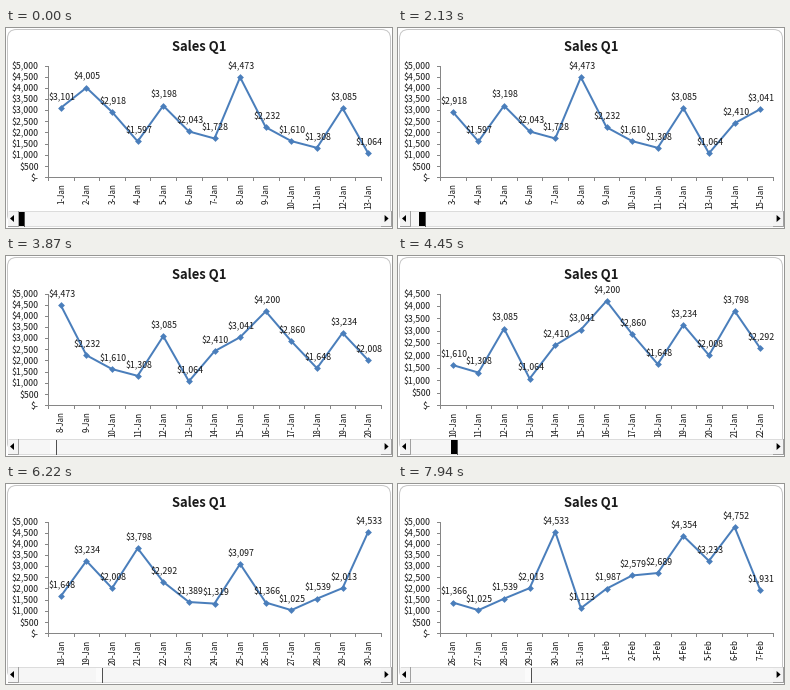
Animation, 386 px wide and 200 px high, one loop 8 s. Source, as a matplotlib script:

```python
import numpy as np
import matplotlib.pyplot as plt
from matplotlib.animation import FuncAnimation
from matplotlib.patches import FancyBboxPatch, Polygon, Rectangle

W, H, DPI = 386, 200, 100
INTERVAL, LOOP = 20, 8000
VISIBLE, UNIT = 13, 500
LEFT, RIGHT, TOP, BOTTOM = 42, 375, 37.5, 149
BLUE, GREY, INK = "#4a7ebb", "#868686", "#1a1a1a"

# Dragging starts at DRAG_START and the chart follows in even steps
DRAG_START, STEP = 1540, 291
DRAG_TIMES, DRAG_DAYS = (1500, 3870, 5340, 7940), (0, 7, 13, 25)

# Daily sales in dollars, printed as the data labels
SALES = np.array([
    3101, 4005, 2918, 1597, 3198, 2043, 1728, 4473, 2232, 1610, 1308, 3085, 1064,
    2410, 3041, 4200, 2860, 1648, 3234, 2008, 3798, 2292, 1389, 1319, 3097, 1366,
    1025, 1539, 2013, 4533, 1113, 1987, 2579, 2689, 4354, 3233, 4752, 1931])
DAYS = [f"{d}-Jan" for d in range(1, 32)] + [f"{d}-Feb" for d in range(1, 8)]


def pt(px):
    return px * 72 / DPI


plt.rcParams["font.family"] = ["Noto Sans CJK JP", "Liberation Sans"]
fig = plt.figure(figsize=(W / DPI, H / DPI), dpi=DPI, facecolor="white")
ax = fig.add_axes([0, 0, 1, 1])
ax.set(xlim=(0, W), ylim=(H, 0))
ax.axis("off")


def label(x, y, text="", size=8.8, **kw):
    return ax.text(x, y, text, fontsize=pt(size),
                   **{"color": INK, "va": "baseline", **kw})


def line(xs, ys, color=GREY, width=1, **kw):
    return ax.plot(xs, ys, color=color, lw=pt(width), **kw)[0]


def box(x, y, w, h, face):
    return ax.add_patch(Rectangle((x, y), w, h, fc=face, lw=0))


def arrow_button(x, direction):
    box(x, 183, 10, 15, "#f4f4f4")
    line([x, x + 10, x + 10], [198, 198, 183], "#a0a0a0")
    mid = x + 5 + direction
    ax.add_patch(Polygon([(mid + 2 * direction, 190.5), (mid - 2 * direction, 187),
                          (mid - 2 * direction, 194)], fc="black", lw=0))


# Chart frame, title and axes
ax.add_patch(FancyBboxPatch((1.5, 1.5), 383, 194, fc="white", ec="#c6c6c6",
                            lw=pt(1), boxstyle="round,pad=0,rounding_size=9"))
label(193, 23.5, "Sales Q1", 13, weight="bold", ha="center")
line([LEFT, LEFT], [TOP, BOTTOM])
line([LEFT, RIGHT], [BOTTOM, BOTTOM])
edges = np.linspace(LEFT, RIGHT, VISIBLE + 1)
for edge in edges:
    line([edge, edge], [BOTTOM, BOTTOM + 3])
centers = (edges[:-1] + edges[1:]) / 2

# Scroll bar
box(3, 183, 383, 16, "#f6f6f6")
for y in (183, 198):
    line([3, 386], [y, y], "#dcdcdc")
arrow_button(2, -1)
arrow_button(374.6, 1)
thumb = box(0, 184, 6, 14, "white")
thumb_edge = line([], [], "#505050")

y_ticks = [line([], []) for _ in range(11)]
y_labels = [label(32.5, 0, ha="right") for _ in y_ticks]
day_labels = [label(x + 0.8, 155.5, size=8, rotation=90, ha="center", va="top")
              for x in centers]
series = line(centers, centers, BLUE, 2, marker="D", ms=pt(4.8), mew=0,
              solid_joinstyle="round")
value_labels = [label(x + 1, 0, ha="center") for x in centers]


def first_day(t):
    step_time = DRAG_START + (t - DRAG_START) // STEP * STEP
    return round(float(np.interp(step_time, DRAG_TIMES, DRAG_DAYS)))


def draw(frame):
    t = (frame + 0.5) * INTERVAL
    first = first_day(t)
    values = SALES[first:first + VISIBLE]
    top = int(np.ceil(values.max() * 1.05 / UNIT)) * UNIT

    def to_y(value):
        return BOTTOM - (BOTTOM - TOP) * value / top

    for i, (tick, text) in enumerate(zip(y_ticks, y_labels)):
        amount = i * UNIT
        y = to_y(amount)
        tick.set_data([LEFT - 3, LEFT], [y, y])
        text.set_text(rf"\${amount:,}" if amount else r"\$-")
        text.set_y(y + 3.7)
        for artist in (tick, text):
            artist.set_visible(amount <= top)

    ys = to_y(values)
    series.set_ydata(ys)
    for i, (day, text) in enumerate(zip(day_labels, value_labels)):
        day.set_text(DAYS[first + i])
        text.set_text(rf"\${values[i]:,}")
        text.set_y(ys[i] - 8)

    # The thumb blinks while it holds the focus
    right = 18 + round(4.6 * first)
    thumb.set_x(right - 6)
    thumb.set_facecolor("black" if t % 1065 < 385 else "#fbfbfb")
    thumb_edge.set_data([right, right], [184, 198])


anim = FuncAnimation(fig, draw, frames=LOOP // INTERVAL, interval=INTERVAL,
                     init_func=lambda: draw(0), repeat=True, repeat_delay=0)
plt.show()
```
